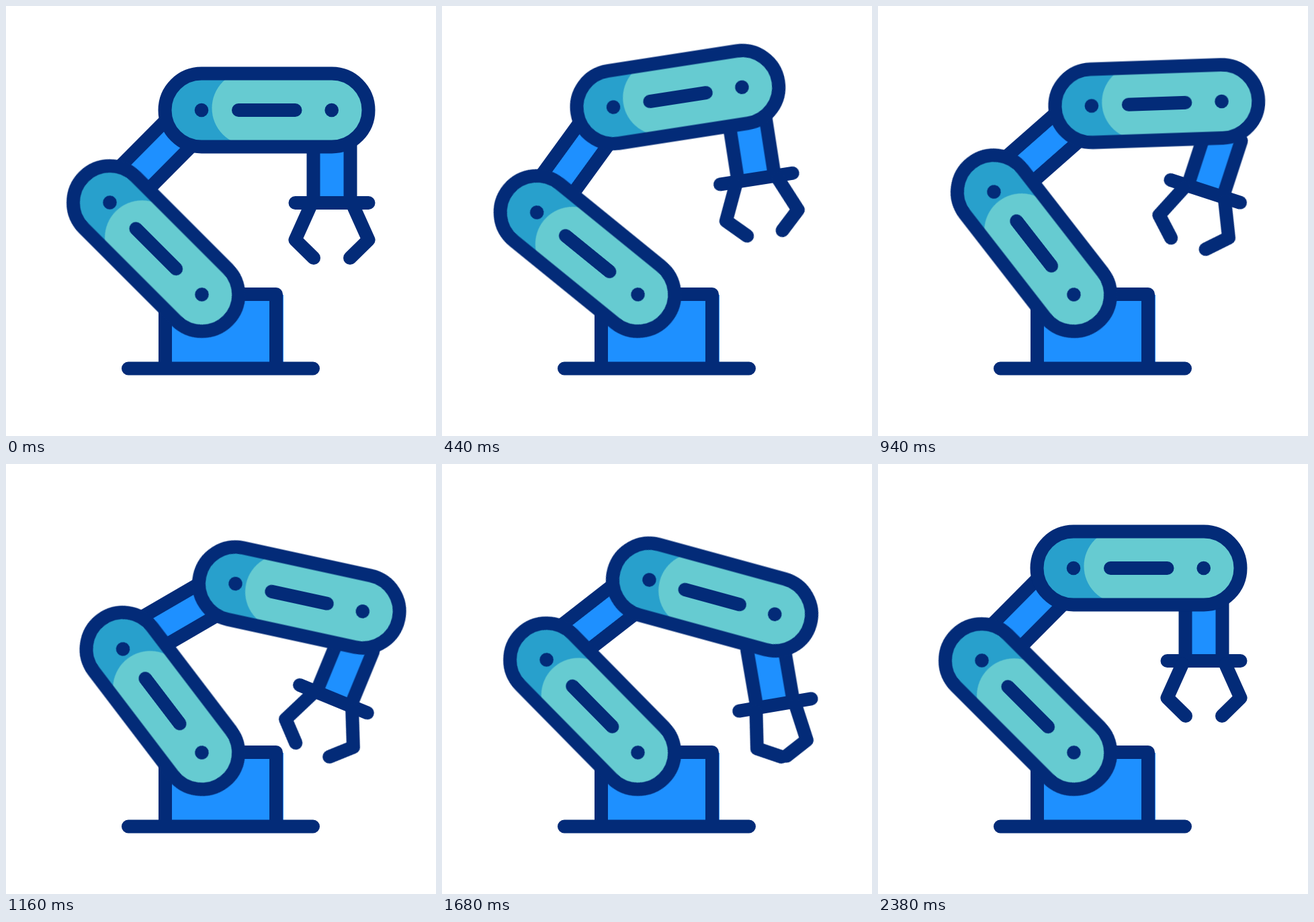
An HTML page for the animation above (2.4 s loop, 640 by 640 pixels).

```html
<!DOCTYPE html>
<html lang="en">
<head>
<meta charset="utf-8">
<title>Robot arm</title>
<style>
  html, body { margin: 0; width: 100%; height: 100%; overflow: hidden; background: #fff; }
  svg { display: block; width: 100vw; height: 100vh; }

  .line { fill: none; stroke: #032b78; stroke-width: 20; stroke-linecap: round; stroke-linejoin: round; }
  .dot { fill: #032b78; }
  .blue { fill: #1e90ff; }
  .shade { fill: #28a0cc; }
  .teal { fill: #66cbd1; }

  .joint { animation: 2400ms cubic-bezier(.333, 0, .667, 1) infinite; }
  .shoulder { transform-origin: 291px 429px; animation-name: shoulder; }
  .elbow { transform-origin: 154.5px 292.5px; animation-name: elbow; }
  .wrist { transform-origin: 291px 155px; animation-name: wrist; }
  .hand { transform-origin: 485px 208px; animation-name: hand; }
  .finger { transform-origin: 455px 290px; animation-name: finger; }

  @keyframes shoulder {
    0%, 72.7%, 100% { transform: rotate(0deg); }
    13.6%, 23% { transform: rotate(-5.9deg); }
    41.5%, 54.8% { transform: rotate(7.7deg); }
  }
  @keyframes elbow {
    0%, 11.25%, 83.5%, 100% { transform: rotate(0deg); }
    25.8%, 34.75% { transform: rotate(-6deg); }
    50.6%, 65.6% { transform: rotate(8.1deg); }
  }
  @keyframes wrist {
    0%, 19.6%, 91.5%, 100% { transform: rotate(0deg); }
    33.2%, 42.8% { transform: rotate(-5.8deg); }
    61.2%, 73.5% { transform: rotate(8deg); }
  }
  @keyframes hand {
    0%, 19.6%, 91.5%, 100% { transform: rotate(0deg); }
    33.2%, 42.8% { transform: rotate(20deg); }
    61.2%, 73.5% { transform: rotate(-25deg); }
  }
  @keyframes finger {
    0%, 17.5%, 37.5%, 59.6%, 79.2%, 100% { transform: rotate(0deg); }
    25.8%, 29.2% { transform: rotate(-11deg); }
    68.3%, 70.8% { transform: rotate(-16deg); }
  }
</style>
</head>
<body>
<svg viewBox="0 0 640 640">
  <defs>
    <g id="arm">
      <rect class="shade" x="-54" y="-54" width="302" height="108" rx="54"/>
      <circle class="teal" cx="71" cy="-3" r="55.5"/>
      <path class="teal" d="M71-52H194A52 52 0 0 1 194 52H71Z"/>
      <rect class="line" x="-54.5" y="-54.5" width="303" height="109" rx="54.5"/>
      <path class="line" d="M55 0H139.5"/>
      <circle class="dot" r="10.3"/>
      <circle class="dot" cx="193.7" r="10.3"/>
    </g>
    <path id="claw" class="line" d="M453 298L430.5 348L458 375"/>
  </defs>

  <!-- base -->
  <path class="blue" d="M237 430H413V530H237Z"/>
  <path class="line" d="M237 538V429H402V538M182 539.5H457"/>

  <g class="joint shoulder">
    <g class="joint elbow">
      <g transform="translate(154.5 292.5) rotate(-45.2)">
        <path class="blue" d="M0-25H194V25H0Z"/>
        <path class="line" d="M10-27H184M10 27H184"/>
      </g>
      <g class="joint wrist">
        <g class="joint hand">
          <path class="blue" d="M460 205H510V293H460Z"/>
          <path class="line" d="M457.5 205V293M512.5 205V293M430.5 293H539.5"/>
          <g class="joint finger"><use href="#claw"/></g>
          <g transform="translate(970) scale(-1 1)">
            <g class="joint finger"><use href="#claw"/></g>
          </g>
        </g>
        <use href="#arm" transform="translate(291 155)"/>
      </g>
    </g>
    <use href="#arm" transform="translate(154.5 292.5) rotate(45) scale(1 -1)"/>
  </g>
</svg>
</body>
</html>
```
